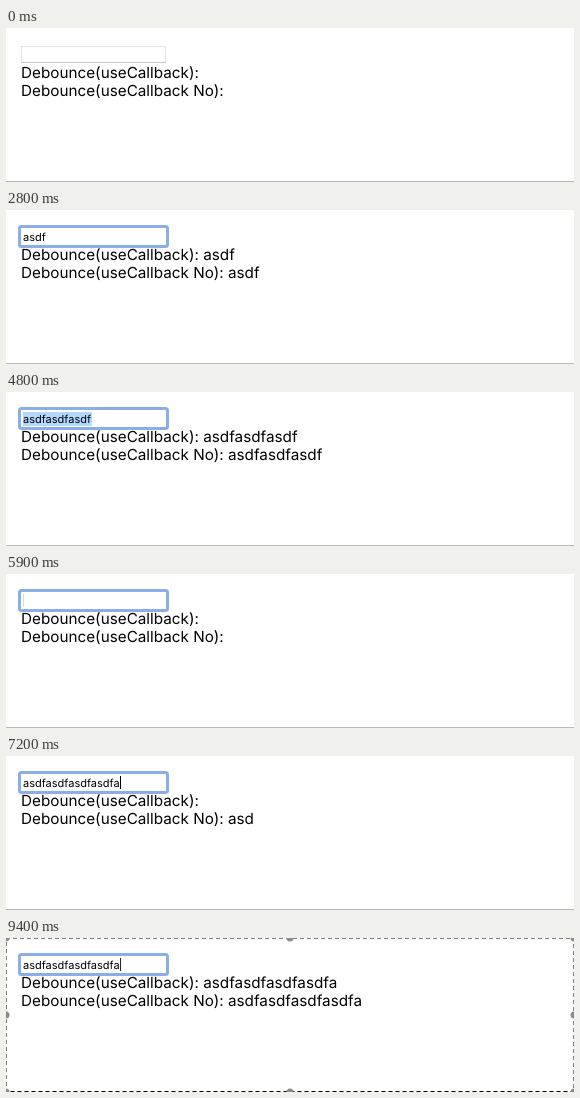
Recreate the animation shown at these times as an HTML page with a canvas. Size 568 px wide and 154 px high, loop 9590 ms.

```html
<!DOCTYPE html>
<html lang="en">
<head>
<meta charset="utf-8">
<title>Debounce with and without useCallback</title>
<style>
  html, body { margin: 0; width: 100%; height: 100%; overflow: hidden; background: #fff; }
  canvas { display: block; }
</style>
</head>
<body>
<canvas id="stage" width="568" height="154"></canvas>
<script>
const LOOP = 9590, STEP = 100, WIDTH = 568, HEIGHT = 154;
const DELAY = 1000, KEY_INTERVAL = 38;
const BLINK = 497, BLINK_START = 912, FADE = 298;
const SHOW_POINTER = 100, FOCUS = 700, HIDE_POINTER = 1400;
const SELECT = 4800, CLEAR = 4900, CAPTURE = 9400;
const ctx = document.getElementById('stage').getContext('2d');

// Each burst of typing grows the text from one length to another.
const bursts = [
  { start: 0, from: 0, to: 0 },
  { start: 1310, from: 0, to: 4 },
  { start: 2850, from: 4, to: 12 },
  { start: CLEAR, from: 0, to: 0 },
  { start: 6050, from: 0, to: 17 }
];
const clamp = value => Math.min(1, Math.max(0, value));
const lerp = (a, b, k) => a + (b - a) * k;
const typed = length => 'asdf'.repeat(5).slice(0, length);
const burstEnd = ({ start, from, to }) => start + (to - from) * KEY_INTERVAL;

function typedAt(t) {
  const { start, from, to } = bursts.findLast(burst => burst.start <= t) ?? bursts[0];
  return typed(Math.min(to, from + Math.floor(Math.max(0, t - start) / KEY_INTERVAL)));
}

function settledAt(t) {
  return typed((bursts.findLast(burst => burstEnd(burst) <= t) ?? bursts[0]).to);
}

function caretAlpha(t) {
  if (t < FOCUS) return 0;
  const half = Math.floor((t - BLINK_START) / BLINK);
  const progress = t - BLINK_START - half * BLINK < FADE ? .15 : 1;
  return half % 2 ? 1 - progress : progress;
}

function rect(color, x, y, w, h) {
  ctx.fillStyle = color;
  ctx.fillRect(x, y, w, h);
}

function text(string, size, x, y) {
  ctx.font = `${size}px Inter, sans-serif`;
  ctx.fillStyle = '#000';
  ctx.fillText(string, x, y);
  return ctx.measureText(string).width;
}

function drawInput(t) {
  if (t >= FOCUS) {
    ctx.strokeStyle = '#8aafe8';
    ctx.lineWidth = 3;
    ctx.beginPath();
    ctx.roundRect(13.5, 16.5, 148, 20, 2);
    ctx.stroke();
  } else {
    rect('#e4e4e4', 15, 18, 145, 17);
    rect('#c6c6c6', 15, 34, 145, 1);
    rect('#fff', 16, 19, 143, 15);
  }
  if (t >= SELECT && t < CLEAR) rect('#b3d7ff', 17, 20, 69, 14);
  const width = text(typedAt(t), 11, 17, 31);
  ctx.globalAlpha = caretAlpha(t);
  rect('#000', Math.ceil(17 + width), 20, 1, 13);
  ctx.globalAlpha = 1;
}

function drawPointer(t) {
  const k = clamp((t - 400) / 200);
  const x = lerp(37.5, 54.5, k), y = lerp(56, 32, k);
  const beam = new Path2D(`M${x - 3} ${y - 7.5}q3 0 3 2v11q0 2 -3 2
    M${x + 3} ${y - 7.5}q-3 0 -3 2v11q0 2 3 2M${x - 2} ${y + 2.5}h4`);
  for (const [color, width] of [['#fff', 2.5], ['#000', 1.2]]) {
    ctx.strokeStyle = color;
    ctx.lineWidth = width;
    ctx.stroke(beam);
  }
}

function drawCaptureFrame() {
  rect('#fff', 0, HEIGHT - 1, WIDTH, 1);
  ctx.strokeStyle = '#000';
  ctx.lineWidth = 1;
  ctx.setLineDash([4, 3]);
  ctx.strokeRect(0, 0, WIDTH, HEIGHT - .5);
  ctx.setLineDash([]);
  ctx.fillStyle = '#8c8c8c';
  for (const column of [0, .5, 1])
    for (const row of [0, .5, 1]) {
      if (column === .5 && row === .5) continue;
      ctx.beginPath();
      ctx.arc(column * WIDTH, row * HEIGHT, 3.5, 0, 2 * Math.PI);
      ctx.fill();
    }
}

function draw(t) {
  rect('#fff', 0, 0, WIDTH, HEIGHT);
  rect('#b9b9b9', 0, HEIGHT - 1, WIDTH, 1);
  drawInput(t);
  text('Debounce(useCallback): ' + settledAt(t - DELAY), 15.28, 15, 50);
  text('Debounce(useCallback No): ' + typedAt(t - DELAY), 15.28, 15, 68);
  if (t >= SHOW_POINTER && t < HIDE_POINTER) drawPointer(t);
  if (t >= CAPTURE) drawCaptureFrame();
}

ctx.textRendering = 'geometricPrecision';
const startTime = performance.now();
function tick() {
  const t = (performance.now() - startTime) % LOOP;
  draw(Math.floor(t / STEP) * STEP);
  requestAnimationFrame(tick);
}
tick();
</script>
</body>
</html>
```
